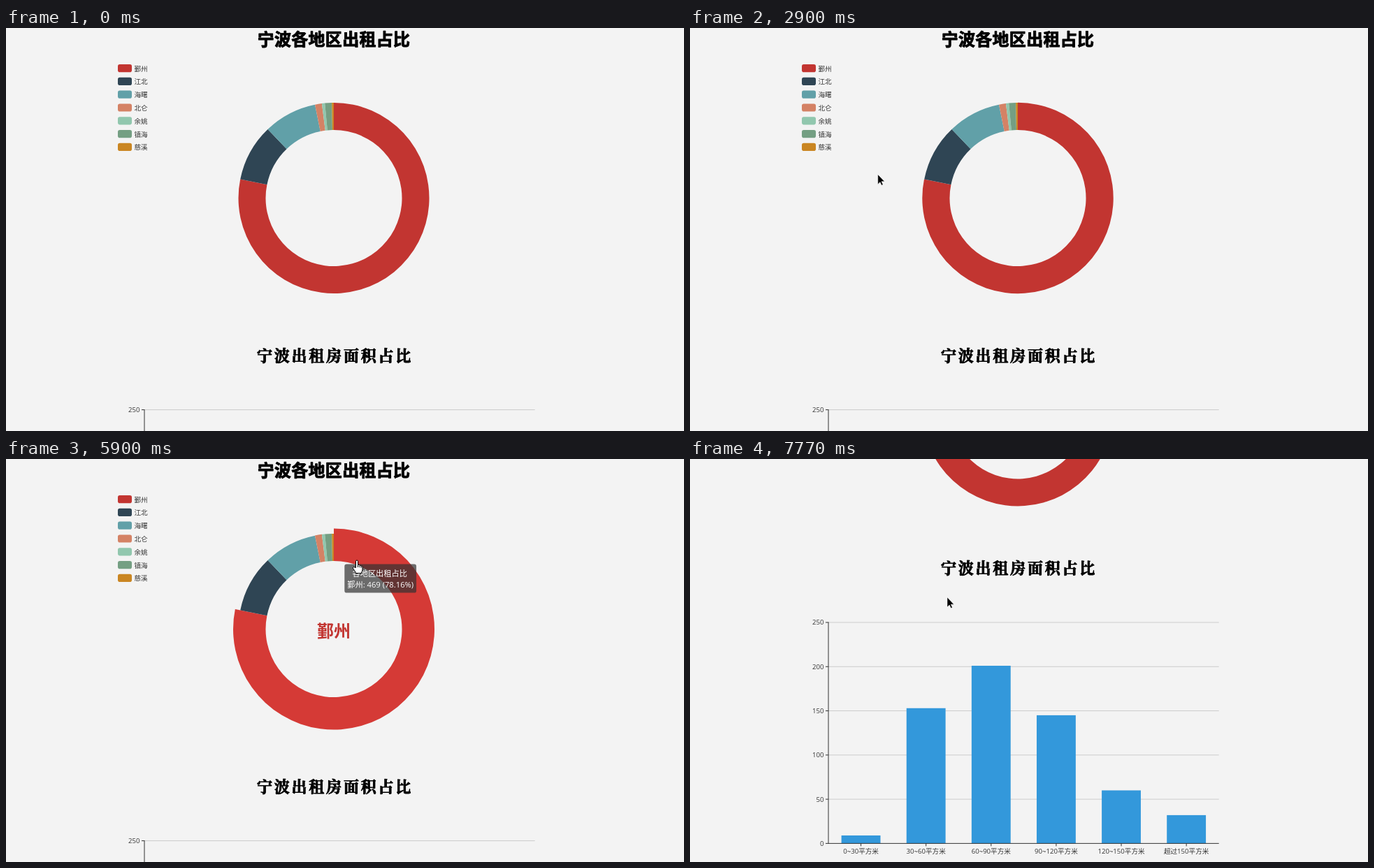
Animation, 970 px wide and 577 px high, one loop 8000 ms. Source, as an HTML page:

```html
<!DOCTYPE html>
<html lang="zh-CN">
<head>
<meta charset="utf-8">
<style>
  html, body { margin: 0; width: 100%; height: 100%; overflow: hidden; background: #f3f3f3; }
  svg { display: block; }
  text { font-family: "Open Sans", "Noto Sans CJK SC", "Noto Sans CJK", sans-serif; }
  .small { font-size: 9.6px; fill: #333; }
  .title { font-weight: 900; text-anchor: middle; stroke: #000; stroke-linejoin: round; }
  .one { font-size: 24px; letter-spacing: .3px; stroke-width: .9; }
  .two { font-size: 22px; letter-spacing: 2.8px; stroke-width: .9; font-family: "Noto Serif CJK SC", "Noto Sans CJK SC", "Noto Sans CJK", serif; }
  .name { font-size: 24px; font-weight: 700; text-anchor: middle; }
  .tip text { font-size: 11.2px; fill: #fff; text-anchor: middle; }
</style>
</head>
<body>
<svg id="stage" width="970" height="577" viewBox="0 0 970 577"></svg>
<script>
const LOOP = 8000, STEP = 77, SHIFT = 42;
const CX = 469, CY = 243.5, INNER = 97.5, OUTER = 136.5, GROW = 8;
const ROW = 57.6, PITCH = 18.8;
const NOTCH = 104.2, NOTCH_TIME = 220, wheel = [6830, 7220, 7360];
const scrollEnd = NOTCH * wheel.length;

const areas = [
  ['鄞州', 469, '#c23531'], ['江北', 58, '#2f4554'], ['海曙', 54, '#61a0a8'],
  ['北仑', 7, '#d48265'], ['余姚', 3, '#91c7ae'], ['镇海', 7, '#749f83'], ['慈溪', 2, '#ca8622']
];
const total = areas.reduce((sum, a) => sum + a[1], 0);
const bars = [
  ['0~30平方米', 9], ['30~60平方米', 153], ['60~90平方米', 201],
  ['90~120平方米', 145], ['120~150平方米', 60], ['超过150平方米', 32]
];

// where the pointer rests or turns: time, x, y
const stops = [
  [70, 852, 511], [430, 598, 230], [820, 586, 62], [1150, 225, 27], [1360, 274, 47],
  [1670, 350, 178], [2100, 350, 178], [2290, 362, 221], [2480, 352, 262], [3360, 174, 150],
  [4050, 172, 122], [4450, 170, 57], [5290, 170, 57], [5800, 502, 145], [6060, 502, 145],
  [6650, 368, 198]
];

const stage = document.getElementById('stage');

function set(node, attrs) {
  for (const key in attrs) node.setAttribute(key, attrs[key]);
}
function add(parent, tag, attrs = {}, content) {
  const node = document.createElementNS('http://www.w3.org/2000/svg', tag);
  set(node, attrs);
  if (content) node.textContent = content;
  return parent.appendChild(node);
}
function show(node, on) {
  node.style.display = on ? '' : 'none';
}
function smooth(x) {
  x = Math.min(1, Math.max(0, x));
  return x * x * (3 - 2 * x);
}
const mix = (a, b, k) => a + (b - a) * k;

function pointerAt(t) {
  const i = stops.findIndex(s => s[0] > t);
  if (i < 1) return stops.at(i).slice(1);
  const [t0, x0, y0] = stops[i - 1], [t1, x1, y1] = stops[i];
  const k = smooth((t - t0) / (t1 - t0));
  return [mix(x0, x1, k), mix(y0, y1, k)];
}
function scrollAt(t) {
  return wheel.reduce((sum, start) => sum + NOTCH * smooth((t - start) / NOTCH_TIME), 0);
}
function ring(a0, a1, r) {
  const at = (a, d) => `${CX + d * Math.sin(a)} ${CY - d * Math.cos(a)}`;
  const large = a1 - a0 > Math.PI ? 1 : 0;
  return `M${at(a0, r)}A${r} ${r} 0 ${large} 1 ${at(a1, r)}` +
    `L${at(a1, INNER)}A${INNER} ${INNER} 0 ${large} 0 ${at(a0, INNER)}Z`;
}
// shares add up to 100, the first one takes the rounding rest
function percent(i) {
  const share = a => +(a[1] / total * 100).toFixed(2);
  const rest = areas.slice(1).reduce((sum, a) => sum - share(a), 100);
  return (i ? share(areas[i]) : rest).toFixed(2);
}

const page = add(stage, 'g');
add(page, 'text', { class: 'title one', x: CX, y: 25 }, '宁波各地区出租占比');
add(page, 'text', { class: 'title two', x: 470.5, y: 476.5 }, '宁波出租房面积占比');

let angle = 0;
const sectors = areas.map(([name, count, color], i) => {
  const y = ROW + i * PITCH, from = angle;
  angle += count / total * Math.PI * 2;
  add(page, 'rect', { x: 160, y: y - 5.6, width: 20, height: 11.2, rx: 2.8, fill: color });
  add(page, 'text', { class: 'small', x: 183.5, y: y + 3.9 }, name);
  return { from, to: angle, node: add(page, 'path', { fill: color }) };
});
const centre = add(page, 'text', { class: 'name', x: CX, y: 254.5 });

// bar chart
const LEFT = 198, RIGHT = 756.7, TOP = 546.6, BASE = 863, SLOT = (RIGHT - LEFT) / 6;
const line = (x1, y1, x2, y2, stroke) => add(page, 'line', { x1, y1, x2, y2, stroke });
for (let v = 0; v <= 250; v += 50) {
  const y = mix(BASE, TOP, v / 250);
  if (v) line(LEFT, y, RIGHT, y, '#ccc');
  line(LEFT - 4, y, LEFT, y, '#333');
  add(page, 'text', { class: 'small', x: 191.5, y: y + 3.5, 'text-anchor': 'end' }, String(v));
}
bars.forEach(([label, value], i) => {
  const x = LEFT + SLOT * (i + .5), y = mix(BASE, TOP, value / 250);
  add(page, 'rect', { x: x - SLOT * .3, y, width: SLOT * .6, height: BASE - y, fill: '#3398db' });
  line(x, BASE, x, BASE + 4, '#333');
  add(page, 'text', { class: 'small', x, y: 878, 'text-anchor': 'middle' }, label);
});
line(LEFT, TOP - .5, LEFT, BASE + .5, '#333');
line(LEFT, BASE, RIGHT, BASE, '#333');

const tip = add(page, 'g', { class: 'tip' });
const tipBox = add(tip, 'rect', { y: 0, height: 41, rx: 3.2, fill: 'rgba(50,50,50,.7)' });
const tipHead = add(tip, 'text', { y: 17 }, '各地区出租占比');
const tipBody = add(tip, 'text', { y: 33 });

const pointer = add(stage, 'g');
const arrow = add(pointer, 'path', {
  d: 'M0 0V14L3.2 11L5.3 15.6L7.4 14.7L5.3 10.2H9.6Z',
  fill: '#000', stroke: '#fff', 'stroke-width': .5
});
const hand = add(pointer, 'path', {
  d: 'M-1.5 10.5V1.5a1.5 1.5 0 0 1 3 0V6.5q2.5-.6 2.5.9q2.2-.5 2.2.8q1.8-.2 1.8 1.3V13' +
     'q0 2.4-1.4 4V18.5H-1.8V17L-5.4 11.8q-.8-1.8.9-2.1Z M1.5 6.5V10M4 7.5V10.3M6.2 8.5V10.6',
  fill: '#fff', stroke: '#000', 'stroke-linejoin': 'round'
});
const busy = add(pointer, 'circle', { cx: 7.3, cy: 18, r: 4.5, fill: '#fff', stroke: '#3296da', 'stroke-width': 3.2 });

// area under the pointer, in the legend or on the ring
function hit(x, y) {
  const row = Math.round((y - ROW) / PITCH);
  if (x > 160 && x < 203 && areas[row] && Math.abs(y - ROW - row * PITCH) < 6.5) return { area: row };
  const dx = x - CX, dy = y - CY, d = Math.hypot(dx, dy);
  if (d < INNER || d > OUTER) return null;
  const a = (Math.atan2(dx, -dy) + Math.PI * 2) % (Math.PI * 2);
  return { area: sectors.findIndex(s => a < s.to), tip: true };
}

// all poses of one loop, each following from the one before
const poses = [];
let over = null, grow = areas.map(() => 0), tipAt = null;
for (let n = -1; SHIFT + n * STEP < LOOP; n++) {
  const t = SHIFT + n * STEP + 10;
  const [x, y] = pointerAt(t), scroll = scrollAt(t);
  // hovering is not renewed while the page scrolls
  if (scroll === 0 || scroll > scrollEnd - .01) over = hit(x, y + scroll);
  grow = grow.map((g, i) => mix(g, over && over.area === i ? 1 : 0, .6));
  tipAt = tipAt ? [mix(tipAt[0], x + 14, .4), mix(tipAt[1], y + 14, .4)] : [x, y];
  poses.push({ t, x, y, scroll, over, grow, tipAt });
}

function draw(time) {
  const n = Math.floor((time - SHIFT) / STEP) + 1;
  const { t, x, y, scroll, over, grow, tipAt } = poses[n];
  page.setAttribute('transform', `translate(0 ${-scroll})`);

  sectors.forEach((s, i) => {
    s.node.setAttribute('d', ring(s.from, s.to, OUTER + GROW * grow[i]));
    s.node.style.filter = over && over.area === i ? 'brightness(1.1)' : '';
  });

  show(centre, over);
  show(tip, over && over.tip);
  if (over) {
    const [name, count, color] = areas[over.area];
    centre.textContent = name;
    centre.setAttribute('fill', color);
    tipBody.textContent = `${name}: ${count} (${percent(over.area)}%)`;
    const width = Math.max(tipHead.getComputedTextLength(), tipBody.getComputedTextLength()) + 8;
    tip.setAttribute('transform', `translate(${tipAt.join(' ')})`);
    tipBox.setAttribute('width', width);
    tipHead.setAttribute('x', width / 2 - 1);
    tipBody.setAttribute('x', width / 2);
  }

  // the pointer shape follows two steps late
  const pointing = poses.slice(Math.max(0, n - 2), n + 1).some(p => p.over);
  pointer.setAttribute('transform', `translate(${x} ${y})`);
  show(pointer, time >= stops[0][0]);
  show(hand, pointing);
  show(arrow, !pointing);
  show(busy, !pointing && t > 3900 && t < 4200);
}

const began = performance.now();
function tick() {
  draw(Math.max(0, performance.now() - began) % LOOP);
  requestAnimationFrame(tick);
}
tick();
</script>
</body>
</html>
```
